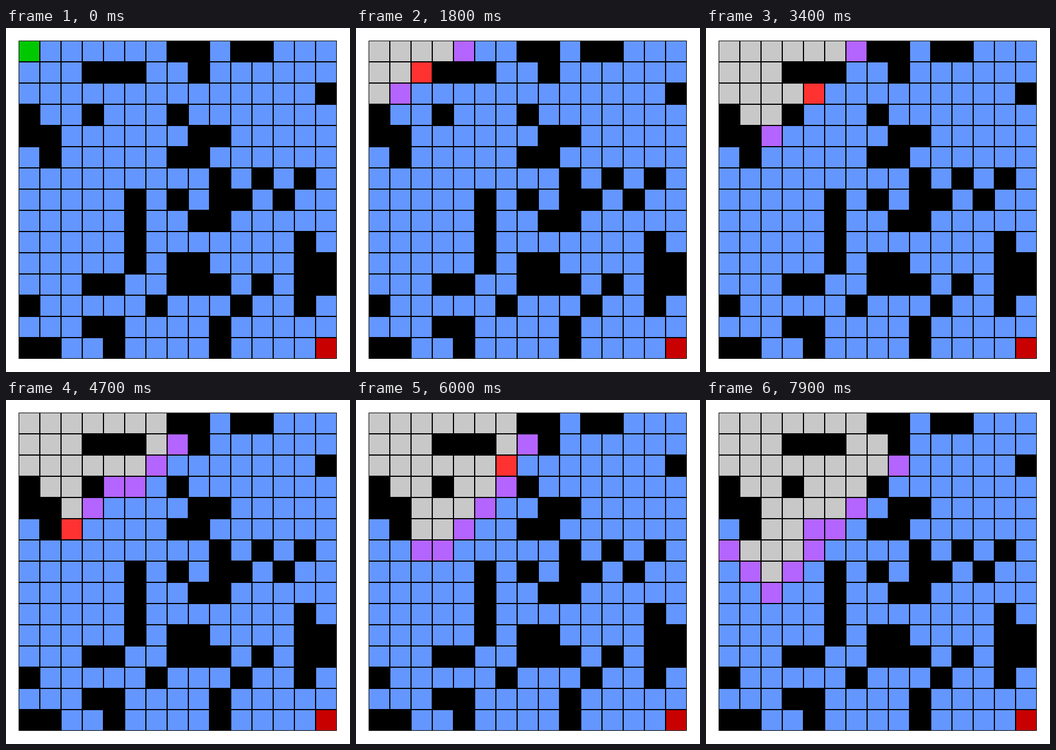
Recreate the animation shown at these times as a matplotlib script. Size 600x600 px, loop 8000 ms.

```python
from itertools import islice

import matplotlib.pyplot as plt
from matplotlib.animation import FuncAnimation
from matplotlib.patches import Rectangle

SIZE, CELL, LEFT = 600, 37, 22
FRAMES, INTERVAL = 80, 100

MAZE = [
    "S......##.##...",
    "...###..#......",
    "..............#",
    "#..#...#.......",
    "##......##.....",
    ".#.....##......",
    ".........#.#.#.",
    ".....#.#.##.#..",
    ".....#..##.....",
    ".....#.......#.",
    ".....#.##....##",
    "...##..###.#.##",
    "#.....#...#..#.",
    "...##....#.....",
    "##..#....#....E",
]
N = len(MAZE)

COLORS = {".": "#6496ff", "#": "#000000", "S": "#00c800", "E": "#c80000"}
QUEUED, CURRENT, DONE = "#b464ff", "#ff3232", "#c8c8c8"
STEPS = [(0, 1), (0, -1), (1, 0), (-1, 0)]  # right, left, down, up


def sift_up(heap, pos):
    item = heap[pos]
    while pos and item[0] < heap[(pos - 1) // 2][0]:
        heap[pos] = heap[(pos - 1) // 2]
        pos = (pos - 1) // 2
    heap[pos] = item


def push(heap, item):
    heap.append(item)
    sift_up(heap, len(heap) - 1)


def pop(heap):
    """Take the nearest item; ties between children go to the right one."""
    last = heap.pop()
    if not heap:
        return last
    top, pos, child = heap[0], 0, 1
    while child < len(heap):
        right = child + 1
        if right < len(heap) and not heap[child][0] < heap[right][0]:
            child = right
        heap[pos] = heap[child]
        pos, child = child, 2 * child + 1
    heap[pos] = last
    sift_up(heap, pos)
    return top


def search():
    """Dijkstra's search, yielding the cell colours after every step."""
    colors = {(r, c): COLORS[MAZE[r][c]] for r in range(N) for c in range(N)}
    yield dict(colors)
    start = (0, 0)
    heap, seen = [(0, start)], {start}
    colors[start] = QUEUED
    yield dict(colors)
    while heap:
        dist, cell = pop(heap)
        colors[cell] = CURRENT
        yield dict(colors)
        colors[cell] = DONE
        for dr, dc in STEPS:
            near = (cell[0] + dr, cell[1] + dc)
            if near not in colors or near in seen or MAZE[near[0]][near[1]] == "#":
                continue
            seen.add(near)
            push(heap, (dist + 1, near))
            colors[near] = QUEUED
            yield dict(colors)


states = list(islice(search(), FRAMES))

fig = plt.figure(figsize=(SIZE / 100, SIZE / 100), dpi=100, facecolor="white")
ax = fig.add_axes([0, 0, 1, 1])
ax.set_xlim(0, SIZE)
ax.set_ylim(SIZE, 0)
ax.axis("off")


def square(x, y, side, color):
    return ax.add_patch(Rectangle((x, y), side, side, facecolor=color, linewidth=0))


square(LEFT, LEFT, N * CELL, "black")
cells = {
    (r, c): square(LEFT + 1 + c * CELL, LEFT + 1 + r * CELL, CELL - 2, color)
    for (r, c), color in states[0].items()
}


def update(frame):
    for key, color in states[frame].items():
        cells[key].set_facecolor(color)
    return list(cells.values())


anim = FuncAnimation(fig, update, frames=FRAMES, interval=INTERVAL,
                     repeat=True, repeat_delay=0, blit=False)
plt.show()
```
